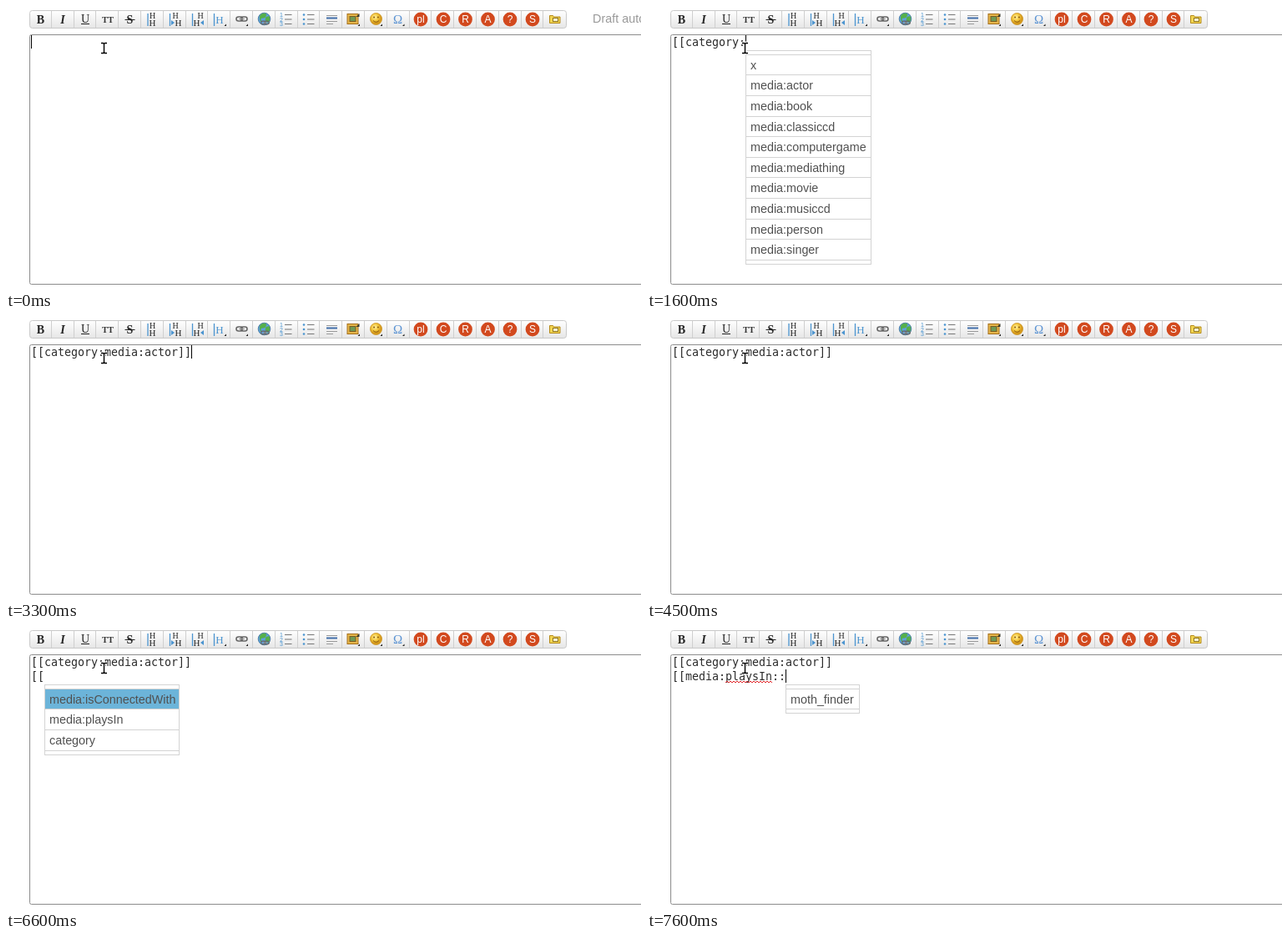
Write an HTML page that moves like this. It is 761 px wide and 338 px high and loops after 8 s.

```html
<!DOCTYPE html>
<html lang="en">
<head>
<meta charset="utf-8">
<title>Editor suggestions</title>
<style>
html, body { margin: 0; width: 100%; height: 100%; overflow: hidden; background: #fff; }
svg { display: block; }
text { white-space: pre; }
.sans { font-family: "Liberation Sans", Arial, sans-serif; }
.serif { font-family: "Liberation Serif", "Times New Roman", serif; }
.mono { font: 13.3px "DejaVu Sans Mono", monospace; fill: #2b2b2b; }
.item { font-size: 14.35px; fill: #505050; }
.mid { text-anchor: middle; }
</style>
</head>
<body>
<svg width="761" height="338" viewBox="0 0 761 338">
  <defs>
    <linearGradient id="face" x2="0" y2="1">
      <stop offset="0" stop-color="#fff"/>
      <stop offset="1" stop-color="#e6e6e6"/>
    </linearGradient>
    <radialGradient id="gold" cx=".4" cy=".35">
      <stop offset="0" stop-color="#fff0a0"/>
      <stop offset=".6" stop-color="#f3c63c"/>
      <stop offset="1" stop-color="#d59a1c"/>
    </radialGradient>
  </defs>
  <g id="bar"></g>
  <text id="draft" class="sans" x="703" y="20" font-size="14.4" fill="#999">Draft autosaved</text>
  <rect x="28.5" y="34.5" width="760" height="299" rx="2" fill="#fff" stroke="#8c8c8c"/>
  <text id="line0" class="mono" x="30" y="48"></text>
  <text id="line1" class="mono" x="30" y="65"></text>
  <path id="wave" fill="none" stroke="#e0262b"/>
  <rect id="caret" width="1" height="16" fill="#000"/>
  <g id="menu"></g>
  <g fill="none">
    <path id="beam" d="M114 44.5h2.5l1 1l1-1h2.5M117.5 45.500v10M114 56.500h2.500l1-1l1 1h2.500" stroke="#fff" stroke-width="3.4"/>
    <use href="#beam"/>
    <path d="M114 44.5h2.5l1 1l1-1h2.5M117.5 45.500v10M114 56.500h2.500l1-1l1 1h2.500" stroke="#000" stroke-width="1.4"/>
  </g>
</svg>
<script>
const $ = id => document.getElementById(id);
const LOOP = 8000, LEFT = 30, CHAR = 8, TOP = 35, LEADING = 17;
const BLUE = '#4a94d0', DARK = '#222';

// Toolbar
const rect = (x, y, w, h, fill, more = '') =>
  `<rect x="${x}" y="${y}" width="${w}" height="${h}" fill="${fill}" ${more}/>`;
const path = (d, stroke, width = 1, fill = 'none') =>
  `<path d="${d}" fill="${fill}" stroke="${stroke}" stroke-width="${width}"/>`;
const disc = (x, y, r, fill, more = '') =>
  `<circle cx="${x}" cy="${y}" r="${r}" fill="${fill}" ${more}/>`;
const label = (s, x, y, size, fill, kind = 'serif', more = '') =>
  `<text class="${kind} mid" x="${x}" y="${y}" font-size="${size}" fill="${fill}" ${more}>${s}</text>`;
const corner = x => path(`M${x} 21.500v2.500h-2.500z`, 'none', 0, DARK);
const head = (x, y, size = 10, fill = DARK) => label('H', x, y, size, fill);
const chain = (x, y) =>
  `<g fill="none" stroke="#666" stroke-width="1.6">
    <rect x="${x - 6.5}" y="${y - 2.5}" width="7.500" height="5" rx="2.500"/>
    <rect x="${x - 1}" y="${y - 2.5}" width="7.500" height="5" rx="2.500"/></g>` +
  path(`M${x - 3.5} ${y}h7`, '#999', 1.2);
const badge = s => x => disc(x, 16, 8.4, '#d2491e') +
  label(s, x, 20.2, 12, '#fff', 'sans');
const list = mark => x => [0, 1, 2].map(i => {
  const y = 11 + i * 5.5;
  return mark(x - 6, y, i) + path(`M${x - 2} ${y - .5}h8.500`, '#777');
}).join('');

const icons = [
  x => label('B', x, 21, 14, DARK, 'serif', 'font-weight="700"'),
  x => label('I', x, 21, 14, DARK, 'serif', 'font-weight="700" font-style="italic"'),
  x => label('U', x, 20, 14, DARK) + path(`M${x - 5} 21.500h10`, DARK),
  x => label('TT', x, 20, 10.5, '#333', 'serif', 'font-weight="700"'),
  x => label('S', x, 21, 14, DARK, 'serif', 'font-weight="700"') + path(`M${x - 6} 16.500h12`, DARK),
  x => path(`M${x - 5.5} 9v15`, BLUE, 1.3) + head(x, 15) + head(x, 24, 11),
  x => path(`M${x - 5.5} 9v15`, BLUE, 1.3) + head(x + 1, 15) + head(x + 4.5, 24, 11) +
    path(`M${x - 4} 17l4 3l-4 3z`, 'none', 0, BLUE),
  x => path(`M${x - 5.5} 9v15`, BLUE, 1.3) + head(x + 4, 15) + head(x - .5, 24, 11) +
    path(`M${x + 8} 17l-4 3l4 3z`, 'none', 0, BLUE),
  x => path(`M${x - 6.5} 9v15`, BLUE, 1.3) + head(x, 21, 13, BLUE) + corner(x + 8),
  x => chain(x, 15.5) + corner(x + 7.5),
  x => disc(x, 15.5, 7.3, '#5d9fdc', 'stroke="#3d7190" stroke-width=".8"') +
    path(`M${x - 5} 11q4-4 8-1l-2 4l-5 1l1 5q-4-4-2-9z`, 'none', 0, '#55b04a') +
    path(`M${x + 2} 13l4-1q2 5-2 8l-3-3z`, 'none', 0, '#55b04a') +
    `<g transform="translate(${x + 1} 20) scale(.75)">${chain(0, 0)}</g>`,
  list((x, y, i) => label(i + 1, x, y + 2, 7, BLUE, 'sans')),
  list((x, y) => disc(x, y - .5, 1.3, BLUE)),
  x => path(`M${x - 6} 11.500h13M${x - 6} 18.500h13M${x - 6} 21.500h8`, '#999') +
    path(`M${x - 6} 14.500h13`, '#3f6ca8', 2),
  x => rect(x - 7.5, 9.5, 13, 12, '#e5b64a', 'stroke="#a66e1a"') +
    rect(x - 4.5, 12.5, 7, 6, '#6f9a55', 'stroke="#7b5a20"') +
    path(`M${x + 3} 13l4-4v4z`, 'none', 0, '#3b3b2b') + corner(x + 7.5),
  x => disc(x, 15.5, 7, 'url(#gold)', 'stroke="#c98f1c" stroke-width=".8"') +
    disc(x - 2.4, 13.5, 1, '#8a5a10') + disc(x + 2.4, 13.5, 1, '#8a5a10') +
    path(`M${x - 3.5} 17.500q3.500 3.500 7 0`, '#8a5a10') + corner(x + 7.5),
  x => label('Ω', x - .5, 21, 15, '#5b93d3') + corner(x + 7.5),
  ...['pl', 'C', 'R', 'A', '?', 'S'].map(badge),
  x => path(`M${x - 6.5} 11.500h4l1 1.500h7.500v7.500h-12.500z`, '#b58a1a', 1, '#f2d552') +
    rect(x - 2.5, 14.5, 6, 4, '#fff8d0', 'stroke="#8f7420"')
];
const PITCH = 26.8;
$('bar').innerHTML =
  rect(28.5, 5.5, 643, 21, 'url(#face)', 'rx="3" stroke="#c9c9c9"') +
  icons.map((icon, i) =>
    (i ? path(`M${Math.round(28 + i * PITCH) - .5} 6v20`, '#cfcfcf') : '') +
    icon(Math.round((28 + (i + .5) * PITCH) * 2) / 2)).join('');

let zigzag = 'M94 68';
for (let x = 96, up = true; x <= 150; x += 2, up = !up) zigzag += `L${x} ${up ? 66 : 68}`;
$('wave').setAttribute('d', zigzag);

// Suggestion menus
const media = names => names.split(' ').map(n => 'media:' + n);
const first = { items: ['category'], width: 67, row: 0 };
const kinds = {
  items: ['x', ...media('actor book classiccd computergame mediathing movie musiccd person singer')],
  width: 151, row: 0
};
const links = { items: [...media('isConnectedWith playsIn'), 'category'], width: 162, row: 1 };
const works = { items: ['moth_finder'], width: 89, row: 1 };

function drawMenu(menu, col, pick) {
  if (!menu) return '';
  const { items, width, row } = menu;
  const x = LEFT + col * CHAR, top = 53 + row * LEADING;
  const edge = i => Math.round(4.8 + 24.6 * i) + top;
  const bottom = edge(items.length) + 5;
  let out = rect(x + .5, top + .5, width - 1, bottom - top, '#fff', 'stroke="#d3d3d3"');
  for (let i = 0; i <= items.length; i++) {
    const y = edge(i);
    out += path(`M${x} ${y + .5}h${width}`, '#d3d3d3');
    if (i === items.length) break;
    if (i === pick) out += rect(x + 1, y + 1, width - 2, edge(i + 1) - y - 1, '#6cb4d9');
    out += `<text class="sans item" x="${x + 6}" y="${y + 18}">${items[i]}</text>`;
  }
  return out;
}

// Each entry lists what changes from the entry before it; caret is [row, column].
const tag = '[[category:media:actor]]';
const changes = [
  [0, { draft: true, a: '', b: '', caret: [0, 0], menu: null, col: 0, pick: -1, wave: false }],
  [100, { draft: false, a: '[', caret: [0, 1] }],
  [200, { a: '[[', caret: [0, 2] }],
  [300, { menu: first, col: 2 }],
  [600, { a: '[[c', caret: [0, 3], col: 3 }],
  [900, { caret: null }],
  [1100, { pick: 0 }],
  [1400, { a: '[[category:', caret: [0, 11], menu: null, pick: -1 }],
  [1600, { menu: kinds, col: 11 }],
  [2100, { caret: null }],
  [2200, { pick: 0 }],
  [2400, { pick: 1 }],
  [3300, { a: tag, caret: [0, 24], menu: null, pick: -1 }],
  [3400, { caret: null }],
  [4000, { caret: [1, 0] }],
  [4500, { caret: null }],
  [5500, { b: '[', caret: [1, 1] }],
  [5700, { b: '[[', caret: null, menu: links, col: 2 }],
  [6600, { pick: 0 }],
  [6900, { pick: 1 }],
  [7000, { caret: [1, 2] }],
  [7500, { b: '[[media:playsIn::', caret: [1, 17], menu: null, pick: -1, wave: true }],
  [7600, { menu: works, col: 17 }]
];
let last = {};
const states = changes.map(([at, change]) => last = { ...last, ...change, at });

const show = (id, on) => $(id).setAttribute('visibility', on ? 'visible' : 'hidden');
let current;

function render(time) {
  const s = states.filter(state => state.at <= time).pop();
  if (s === current) return;
  current = s;
  show('draft', s.draft);
  show('wave', s.wave);
  show('caret', s.caret);
  $('line0').textContent = s.a;
  $('line1').textContent = s.b;
  if (s.caret) {
    $('caret').setAttribute('x', LEFT + s.caret[1] * CHAR);
    $('caret').setAttribute('y', TOP + s.caret[0] * LEADING);
  }
  $('menu').innerHTML = drawMenu(s.menu, s.col, s.pick);
}

const start = performance.now();
function tick() {
  render((performance.now() - start) % LOOP);
  requestAnimationFrame(tick);
}
tick();
</script>
</body>
</html>
```
